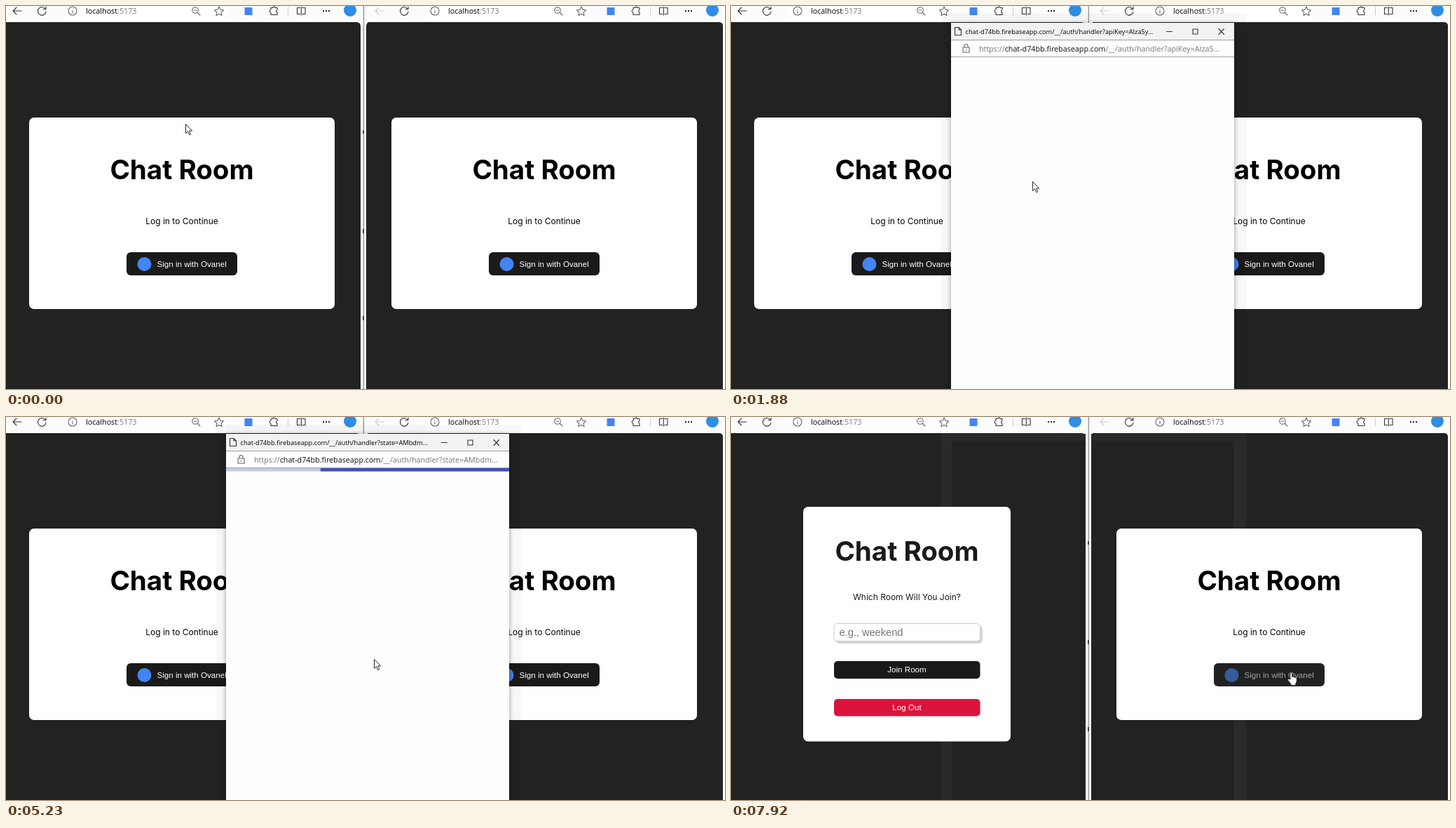
An HTML page that plays this animation: 1026 px wide and 546 px high, repeating every 8 s.

```html
<!DOCTYPE html>
<html lang="en">
<head>
<meta charset="utf-8">
<title>Chat Room</title>
<style>
html, body { margin: 0; width: 100%; height: 100%; overflow: hidden; background: #fafafa; }
svg { display: block; width: 100%; height: 100%; }
text { font-family: "Liberation Sans", Arial, sans-serif; font-size: 11.6px; }
.mid { text-anchor: middle; }
.geo { font-family: Inter, sans-serif; font-size: 12px; }
.head { font-family: Inter, sans-serif; font-size: 38.5px; font-weight: 700; }
.ui { font-family: "Open Sans", "Noto Sans", sans-serif; font-size: 10.75px; }
.line { fill: none; stroke: #333; stroke-width: 1.1; stroke-linecap: round; stroke-linejoin: round; }
.grey { fill: #767676; }
.btn { fill: var(--btn, #1a1a1a); }
.dim { opacity: var(--dim, 1); }
.hover { --dim: .58; --btn: #212121; }
#win { filter: drop-shadow(0 1px 3px rgba(0, 0, 0, .4)); }
#popup { transform-origin: 516px 300px; }
</style>
</head>
<body>
<svg viewBox="0 0 1026 546">
  <defs>
    <g id="browser">
      <path d="M-1 546V23H500Q506 23 506 29V546z" fill="#222"/>
      <path class="line" style="stroke:currentColor" d="M22 7H10M15 2L10 7L15 12"/>
      <path class="line" d="M56 4A5.8 5.8 0 1 0 57 8M57 1V4.500H53"/>
      <g class="line" style="stroke:#666">
        <circle cx="95" cy="7" r="6"/><path d="M95 6.500V10M95 4V4.100"/>
        <circle cx="270" cy="6" r="4.300"/><path d="M268 6H272M273.500 9.500L277 13"/>
        <path d="M304 1L306 5.200L310.500 5.800L307.200 9L308 13.500L304 11.300L300 13.500L300.800 9L297.500 5.800L302 5.200z"/>
      </g>
      <text class="ui" x="114" y="11">localhost<tspan class="grey">:5173</tspan></text>
      <rect x="340.500" y="2" width="11" height="11" fill="#4285f4"/>
      <path class="line" d="M378 2.500H380.500A2 2 0 0 1 384.300 2.500H387V5.500A2 2 0 0 0 387 9.300V12.500H378V9.500A2.300 2.300 0 0 1 378 5z"/>
      <path d="M402.500 1V13" stroke="#ccc"/>
      <path class="line" d="M419.500 2.500H415.500V11.500H419.500M423 2.500H427V11.500H423M421.300 1V13"/>
      <path d="M452 7h2m2 0h2m2 0h2" stroke="#222" stroke-width="2"/>
      <circle cx="491" cy="6" r="9" fill="#2f8de4"/>
    </g>
    <g id="login">
      <rect x="33" y="159" width="436" height="273" rx="7" fill="#fff"/>
      <text class="head mid" x="251" y="247">Chat Room</text>
      <text class="geo mid" x="251" y="310.500">Log in to Continue</text>
      <rect class="btn" x="172" y="351" width="158" height="33" rx="6"/>
      <g class="dim">
        <circle cx="197.500" cy="368" r="10" fill="#4285f4"/>
        <text x="215.500" y="372.300" fill="#fff">Sign in with Ovanel</text>
      </g>
    </g>
    <clipPath id="body"><rect x="314" y="24" width="404" height="540"/></clipPath>
  </defs>

  <rect width="1026" height="546" fill="#fcfcfc"/>
  <rect x="84" width="231" height="21" fill="#fff"/>
  <rect x="601" width="228" height="21" fill="#fff"/>
  <use href="#browser" color="#333"/>
  <use href="#browser" x="517" color="#ccc"/>
  <path d="M514 546V29Q514 23 520 23H1017Q1023 23 1023 29V546z" fill="#222"/>
  <rect id="gap" x="511" width="3" height="546"/>
  <path d="M510.300 0V546" stroke="#9a9a9a" stroke-width="1.400"/>
  <path d="M510 177v5m0 136v6m0 118v6" stroke="#444" stroke-width="2"/>
  <path id="trace" fill="#2a2a2a" d="M300 24H506V34H315V546H300zM514 24H735V546H717V34H514z"/>

  <use id="left" href="#login"/>
  <use id="right" href="#login" x="517"/>
  <g id="room">
    <rect x="103" y="128" width="296" height="334.500" rx="7" fill="#fff"/>
    <text class="head mid" x="251" y="205" fill="#1a1a1a">Chat Room</text>
    <text class="geo mid" x="251" y="261" fill="#1a1a1a">Which Room Will You Join?</text>
    <rect x="149" y="297" width="210" height="26" rx="6" fill="#d4d4d4"/>
    <rect x="147" y="294.500" width="208.500" height="25" rx="5" fill="#fff" stroke="#ccc"/>
    <text x="154.500" y="312" fill="#757575" style="font-size:14.600px">e.g., weekend</text>
    <rect x="147" y="348" width="208.500" height="25" rx="5" fill="#1a1a1a"/>
    <text class="mid" x="251" y="364.300" fill="#fff">Join Room</text>
    <rect x="147" y="402" width="208.500" height="24.500" rx="5" fill="#dc143c"/>
    <text class="mid" x="251" y="418.300" fill="#fff">Log Out</text>
  </g>

  <rect id="haze" x="300" y="11" width="435" height="535" opacity=".03"/>
  <g id="popup">
    <g id="win">
      <rect id="page" x="314" y="24" width="404" height="540"/>
      <rect x="314" y="24" width="404" height="24.500" fill="#f2f2f2"/>
      <path d="M314 48.500H718M314 72.500H718" stroke="#a0a0a0"/>
      <path class="line" d="M621.500 36.500H629.500M659 33H666V40H659zM696 32.500L703.500 40.500M703.500 32.500L696 40.500"/>
      <g id="blankIcons">
        <circle cx="319" cy="37" r="1.200"/>
        <g class="line" style="stroke:#666"><circle cx="335.500" cy="61" r="6"/><path d="M335.500 60.500V64M335.500 58V58.100"/></g>
      </g>
      <g id="siteIcons" class="line">
        <path d="M319.500 30.500H325L328.500 34V41.500H319.500zM325 30.500V34H328.500"/>
        <path style="stroke:#666" d="M331 59H340V66H331zM333 59V57Q333 54.500 335.500 54.500T338 57V59M335.500 62V63"/>
      </g>
      <text id="title" class="ui" x="334.500" y="40" style="font-size:9.250px"></text>
      <text class="ui grey" x="354" y="65"><tspan id="scheme"></tspan><tspan id="host" fill="#111"></tspan><tspan id="path"></tspan></text>
    </g>
    <g id="bar" clip-path="url(#body)">
      <rect x="314" y="73" width="404" height="4.500" fill="#c5cae9"/>
      <rect id="fill" y="73" height="4.500" fill="#3f51b5"/>
    </g>
  </g>
  <path id="arrow" fill="#fff" stroke="#111" stroke-width=".9" d="M.5 .5V13.500L3.500 10.700L5.600 15.700L7.700 14.800L5.600 9.900H9.700z"/>
  <path id="hand" fill="#fff" stroke="#111" stroke-width=".8" d="M4 10V2.200c0-2 2.800-2 2.800 0V6.800c.3-1 2.300-.9 2.400 .4 .4-.9 2.100-.7 2.200 .6 .5-.7 1.900-.4 1.900 .9V13l-1.600 3.400v2H5v-1.600L.8 11.300C0 9.900 1.500 8.900 2.500 9.600z"/>
</svg>
<script>
const LOOP = 8000;
const $ = id => document.getElementById(id);
const show = (id, on) => $(id).style.display = on ? "" : "none";

// moments at which the screen refreshes
const ticks = [0, 120, 240, 360, 520, 660, 950, 1210, 1340, 1490, 1610, 1750, 1870, 2000, 2140, 2260,
  2400, 2530, 2660, 2790, 2920, 3050, 3190, 3320, 3740, 3860, 4010, 4290, 4420, 4700, 4830, 4960,
  5100, 5230, 5370, 5500, 5640, 5770, 6180, 6320, 6470, 6620, 6760, 7550, 7670, 7790, 7920];

// pointer: time, x, y, hand
const pointer = [
  [0, 256, 168], [120, 262, 235], [240, 268, 320],
  [360, 267, 364, 1], [520, 268, 365.5, 1], [660, 270, 365.5, 1], [1210, 271, 364, 1],
  [1340, 272, 363, 1], [1490, 273, 361.5, 1],
  [1750, 350, 310], [1870, 430, 250], [2000, 490, 224], [2140, 510, 225], [2260, 518, 226],
  [2400, 521, 290], [2530, 524, 340], [2660, 525, 353], [3050, 525, 351], [3320, 525, 350],
  [3740, 525, 349], [4010, 525, 348], [4290, 525, 347], [4420, 525, 346], [4960, 525, 345],
  [5640, 525, 344], [7550, 570, 370], [7670, 680, 381], [7790, 765, 376], [7920, 794, 364, 1]
];

// popup look: time, opacity, scale
const looks = [[0, 0, 1], [1340, .3, .985], [1490, .914, .995], [1610, 1, 1],
  [6470, .5, .985], [6620, .12, .955], [6760, 0, 1]];

const last = (list, t) => list.filter(k => k[0] <= t).pop();

function setText(t) {
  const site = t >= 1870;
  const base = "chat-d74bb.firebaseapp.com", path = "/__/auth/handler?";
  const state = t >= 4290;
  $("title").textContent = site ? base + path + (state ? "state=AMbdm..." : "apiKey=AIzaSy...")
    : "Adsız - Kişisel - Narvolith Cove";
  $("scheme").textContent = site ? "https://" : "about:";
  $("host").textContent = site ? base : "blank";
  $("path").textContent = site ? path + (state ? "state=AMbdm..." : "apiKey=AIzaS...") : "";
  show("blankIcons", !site);
  show("siteIcons", site);
  $("page").setAttribute("fill", site ? "#fefefe" : "#f6f6f6");
}

// grows to 75% while sliding to 25%, then leaves on the right
function setBar(t) {
  const second = t >= 4700;
  show("bar", t >= 2140 && t < 3740 || second);
  const phase = Math.max(0, t - (second ? 4190 : 1795)) % 1970 / 1970;
  const grow = Math.min(1, phase * 2), leave = Math.min(1, Math.max(0, phase * 4 - 2));
  const x = .25 * grow + .75 * leave;
  $("fill").setAttribute("x", 314 + 404 * x);
  $("fill").setAttribute("width", 404 * .75 * grow * (1 - leave));
}

function draw(t) {
  const [, x, y, hand] = last(pointer, t);
  show("arrow", !hand);
  show("hand", hand);
  $(hand ? "hand" : "arrow").setAttribute("transform", `translate(${x} ${y})`);

  $("left").classList.toggle("hover", t >= 360 && t < 1750);
  $("right").classList.toggle("hover", t >= 7920);
  $("gap").setAttribute("fill", t < 950 ? "#f2f2f2" : "#f7f7f7");
  show("left", t < 6470);
  show("room", t >= 6470);
  show("haze", t >= 1490 && t < 6620);
  show("trace", t >= 6620);

  const [, opacity, scale] = last(looks, t);
  show("popup", opacity);
  $("popup").style.opacity = opacity;
  $("popup").style.transform = `scale(${scale})`;
  setText(t);
  setBar(t);
}

let start, shown;
function frame(now) {
  start ??= now;
  const t = (now - start) % LOOP;
  const tick = ticks.findLast(k => k <= t);
  if (tick !== shown) draw(shown = tick);
  requestAnimationFrame(frame);
}
draw(0);
requestAnimationFrame(frame);
</script>
</body>
</html>
```
